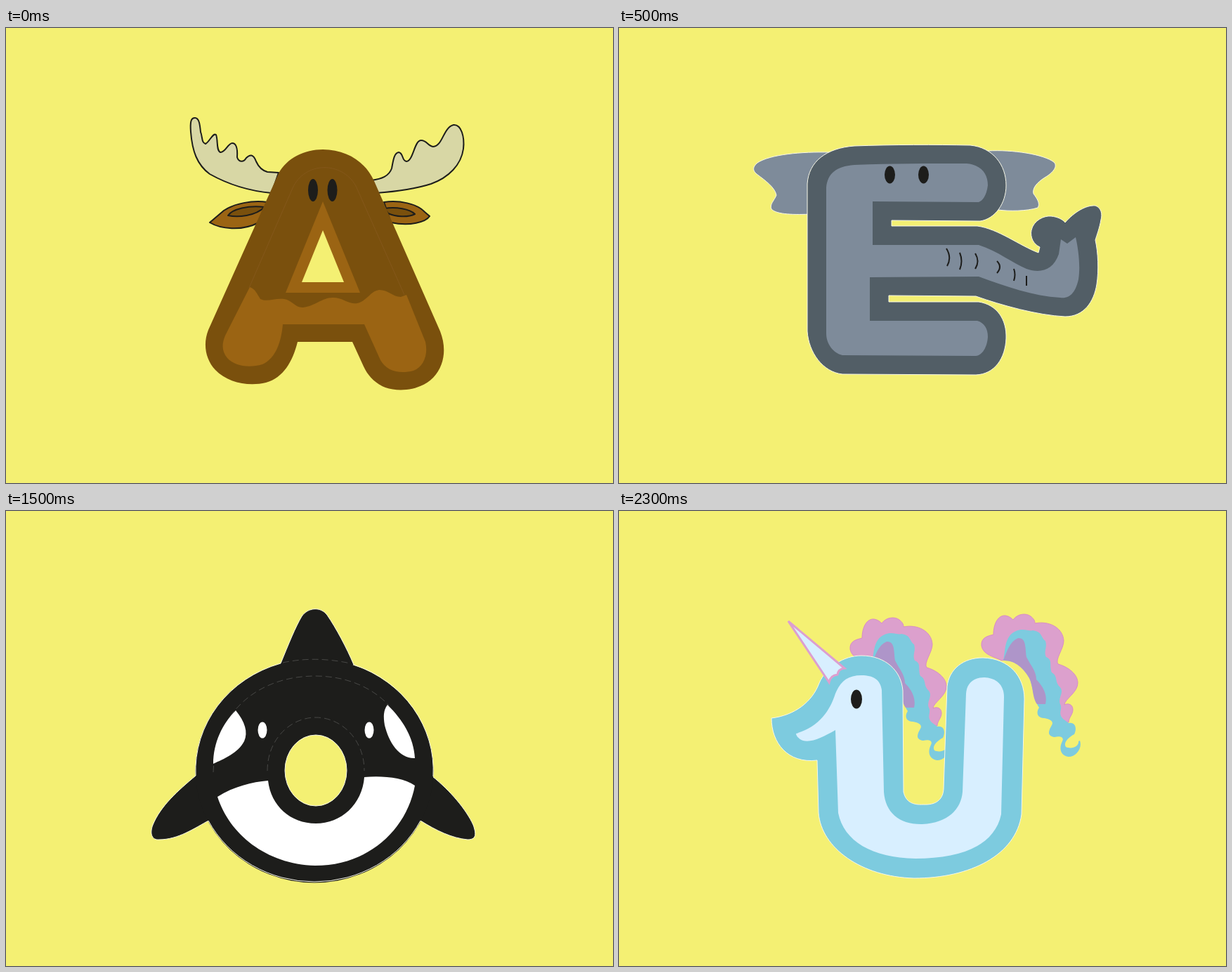
Animation, 864 px wide and 648 px high, one loop 2.5 s. Source, as an HTML page:

```html
<!DOCTYPE html>
<html lang="en">
<head>
<meta charset="utf-8">
<title>Animal vowels</title>
<style>
  html, body { margin: 0; width: 100%; height: 100%; overflow: hidden; background: #f4f073; }
  svg { display: block; width: 864px; height: 648px; }
  svg > g { display: none; }
  svg > g.on { display: inline; }
  .ink { fill: #1d1d1b; }
  .white { fill: #fff; }
  .sky { fill: #f4f073; }
  .line { stroke: #1d1d1b; stroke-width: 2; stroke-linejoin: round; }
  .halo { stroke: #f8f8e8; stroke-width: 1; }
  .bark { fill: #7a500d; }
  .fur { fill: #9b6413; }
  .antler { fill: #d8d7a5; }
  .slate { fill: #525e66; }
  .steel { fill: #7e8b9a; }
  .forest { fill: #009247; }
  .leaf { fill: #4cae4a; }
  .teal { fill: #7dcbdf; }
  .ice { fill: #d8efff; }
  .pink { fill: #dca0cd; }
  .lilac { fill: #ae95c9; }
  .seam { fill: none; stroke-width: 1; }
</style>
</head>
<body>
<svg viewBox="0 0 864 648">
  <g id="moose">
    <g class="line">
      <path class="antler" d="M388 206L372 205C365 203 360 199 356 190C352 179 347 180 342 185C338 192 331 191 329 184C330 170 327 164 322 164C316 164 312 178 305 177C299 174 302 160 299 152C294 149 290 162 284 165C278 163 280 156 277 148C276 138 275 128 269 128C263 128 262 134 263 148C265 175 272 195 290 208C315 222 345 232 378 235Z"/>
      <path class="antler" d="M520 217C535 215 545 211 549 200C551 190 552 178 559 177C566 178 563 189 570 190C580 189 581 160 591 160C599 160 600 168 608 169C622 168 622 142 637 138C648 137 653 155 651 172C648 195 630 213 605 222C580 230 555 233 527 235Z"/>
      <path class="fur" d="M372 248C350 245 325 250 310 260C303 266 296 272 290 277C305 286 335 290 360 277Z"/>
      <path class="fur" d="M538 248C560 245 585 250 596 262L603 268C598 276 575 283 548 277Z"/>
      <path class="bark" d="M368 255C345 252 322 258 316 267C330 270 355 268 368 255Z"/>
      <path class="bark" d="M539 257C555 254 575 258 582 265C572 270 555 269 544 264Z"/>
    </g>
    <path class="bark" d="M388 207C400 185 425 173 451 173C485 173 512 191 524 218L618 432C627 455 625 480 608 498C590 516 560 519 540 512C525 506 515 495 509 482L493 447H415C408 475 395 498 370 505C345 511 315 505 298 487C284 472 280 450 288 430Z"/>
    <path class="fur" d="M347 369C355 372 357 378 362 386C372 391 383 384 396 386C408 388 412 399 423 398C440 396 450 384 465 384C480 384 488 394 500 392C515 388 518 375 531 373C545 373 550 383 562 383L570 380L597 447C601 465 595 482 580 488C560 493 542 489 533 473L510 422H394C392 445 385 470 365 479C345 485 325 481 315 470C307 460 307 450 312 438Z"/>
    <path class="seam" stroke="#84571a" d="M346 370L408 228C425 190 478 189 498 225L567 380"/>
    <path class="fur" d="M451 247L504 377H398Z"/>
    <path class="sky" d="M451 288L481 362H421Z"/>
    <ellipse class="ink" cx="437" cy="231" rx="7" ry="16"/>
    <ellipse class="ink" cx="464.5" cy="231" rx="7" ry="16"/>
  </g>

  <g id="elephant">
    <path class="steel halo" d="M300 177C260 176 215 180 197 192C190 198 190 203 196 208C208 217 222 227 224 238C221 246 214 251 217 258C225 266 250 266 275 265Z"/>
    <path class="steel halo" d="M525 175C560 173 605 180 619 191C625 197 618 206 606 213C595 220 588 228 590 236C595 243 600 250 596 256C580 261 555 261 540 259Z"/>
    <path class="slate halo" d="M335 168C390 166 450 166 500 167C532 170 551 195 551 224C551 250 535 272 514 275L388 274V282H510C540 286 570 310 597 320L599 312C590 308 585 298 587 288C590 274 605 267 615 268C625 269 632 273 635 277C648 262 665 252 678 253C687 256 688 266 686 273C684 285 680 295 678 302C682 320 683 345 680 365C676 390 662 411 635 411C595 409 545 395 508 382L384 381V390H512C538 394 552 415 551 442C550 470 535 493 508 494L318 493C290 490 270 462 268 432V222C270 190 295 171 335 168Z"/>
    <path class="steel" d="M335 195C390 193 440 193 495 193C516 195 525 208 525 224C523 240 517 246 512 248L361 247V309H512C540 318 560 335 580 343C600 350 618 345 626 322L629 301L638 307L650 298C654 315 657 340 654 358C650 376 642 386 628 384C590 382 550 368 512 354L357 355V417H510C520 420 525 428 525 440C524 455 517 466 508 467L318 466C305 463 295 450 295 435V227C297 208 308 197 335 195Z"/>
    <ellipse class="ink" cx="385.5" cy="209" rx="7.5" ry="12.5"/>
    <ellipse class="ink" cx="433.5" cy="209" rx="7.5" ry="12.5"/>
    <path class="line" fill="none" stroke-width="2.5" d="M466 314Q474 327 467 339M485 320Q490 332 485 344M507 321Q514 332 507 343M538 332Q546 340 538 349M562 343Q565 351 562 360M580 353V367"/>
  </g>

  <g id="iguana">
    <path class="leaf" stroke="#1f3350" stroke-width="1.2" d="M503 450C512 470 525 490 543 488C556 485 560 470 556 458C552 451 547 456 553 463C550 472 538 468 536 456C536 446 545 439 555 440C572 443 581 460 581 478C580 500 560 517 535 517C515 517 498 508 485 494Z"/>
    <path id="spikes" class="forest" stroke="#1f3350" stroke-width="1.5"/>
    <rect class="forest halo" x="376" y="174.500" width="128.500" height="338.500" rx="64" stroke-opacity=".5"/>
    <path class="forest" d="M478 188L495 203L504 235V450H494V210Z"/>
    <rect class="leaf" x="401" y="199" width="78.500" height="289" rx="39"/>
    <ellipse class="ink" cx="426.500" cy="242" rx="7.500" ry="12.500"/>
    <ellipse class="ink" cx="451.500" cy="242" rx="7.500" ry="12.500"/>
  </g>

  <g id="orca">
    <path class="ink halo" d="M391 217C402 190 412 165 421 150C430 137 448 136 457 148C470 167 485 195 495 219L440 260Z"/>
    <path class="ink halo" d="M270 377C245 398 220 420 209 447C204 460 208 469 218 468C245 468 268 452 290 440L320 400Z"/>
    <path class="ink halo" d="M607 378C632 398 655 425 665 447C670 461 669 468 657 468C635 466 612 455 590 441L560 400Z"/>
    <ellipse class="ink" cx="439" cy="370" rx="169.500" ry="159.500"/>
    <path class="seam halo" d="M391 217A169.500 159.500 0 0 0 270 377M495 219A169.500 159.500 0 0 1 608 378M288 441A169.500 159.500 0 0 0 590 441"/>
    <path class="seam" stroke="#484846" stroke-dasharray="9 5" d="M394 216Q440 206 490 217M295 372C298 280 365 235 440 235C490 235 525 255 545 277M372 370C372 325 405 294 441 294S510 325 510 370"/>
    <path class="white" d="M301 407C325 392 350 386 373 384C377 420 405 445 441 445C477 445 507 418 510 379C535 377 565 379 582 391C570 455 515 505 440 505C370 503 318 460 301 407Z"/>
    <path class="white" d="M327 284C340 300 345 315 339 328C330 345 310 353 295 360C295 330 308 303 327 284Z"/>
    <path class="white" d="M543 276C565 298 580 322 582 352C560 353 545 330 539 305C537 293 537 284 543 276Z"/>
    <ellipse class="sky halo" cx="441" cy="369.500" rx="44" ry="50.500"/>
    <ellipse class="white" cx="365" cy="312" rx="6.500" ry="11.500"/>
    <ellipse class="white" cx="517" cy="312" rx="6.500" ry="11.500"/>
  </g>

  <g id="unicorn">
    <g id="mane">
      <path class="pink" stroke="#d88cc5" d="M545 213C535 208 518 205 516 192C515 180 525 178 533 176C533 160 540 148 550 149C556 150 559 153 561 155C567 146 580 145 586 150C590 153 592 156 592 160C612 156 632 166 633 185C633 196 620 212 625 218C636 221 652 230 653 244C654 258 634 268 634 276C640 273 646 276 646 283C646 290 640 294 640 301L628 300C600 260 570 200 545 213Z"/>
      <path class="teal" d="M547 213C550 200 548 178 565 171C575 166 585 172 589 170C603 172 600 180 607 185C610 195 604 200 608 208C618 212 612 220 616 230C625 235 620 243 627 250C635 258 624 266 628 275C632 282 624 288 632 296L640 302C650 300 652 310 648 318C640 322 632 330 636 336C645 340 655 335 654 328L656 327C660 338 650 350 640 350C628 348 626 338 631 328C634 322 628 320 620 322C608 320 612 312 616 305C620 298 610 296 605 295C594 294 594 286 598 280C590 268 590 255 585 240C578 225 565 212 547 213Z"/>
      <path class="lilac" d="M547 213C552 200 556 186 568 181C580 180 578 195 580 208C586 220 594 228 594 240C604 250 610 262 607 275L595 275C588 266 590 250 584 238C576 224 563 212 547 213Z"/>
    </g>
    <use href="#mane" x="-187" y="5"/>
    <path class="teal halo" d="M217 295C250 291 275 272 285 245C295 222 320 206 345 206C380 206 402 228 404 256L405 400C408 414 418 419 433 418C450 419 461 412 462 396L467 250C470 225 490 209 518 209C555 210 577 235 577 268L573 432C565 490 500 523 420 523C345 521 288 480 284 430L282 355C240 360 217 330 217 295Z"/>
    <path class="ice" d="M345 234C362 234 372 240 374 255L377 400C379 430 400 447 432 446C468 444 487 425 489 400L494 260C495 245 505 237 520 237C538 238 548 248 548 265L544 432C535 475 490 495 422 495C360 494 320 470 312 430L308 312C290 322 275 330 262 327C256 325 252 320 252 317C285 307 300 285 308 260C315 243 325 234 345 234Z"/>
    <path class="ice" stroke="#dc9fd0" stroke-width="3" d="M241 157L321 224Q312 225 311 233Q301 234 299 244Z"/>
    <ellipse class="ink" cx="338" cy="268" rx="8" ry="13.500"/>
  </g>
</svg>
<script>
  const STEP = 500;
  const scenes = [...document.querySelectorAll("svg > g")];

  // Each spike: tip x, tip y, height of its base.
  const tips = [
    [502, 193, 14], [519, 211, 16], [519, 240, 15], [522, 265, 13], [522, 286, 12],
    [520, 304, 12], [520, 326, 12], [524, 346, 13], [519, 367, 11], [520, 383, 9],
    [517, 396, 8], [516, 409, 9], [516, 431, 9], [521, 443, 9]
  ];
  const backSpike = ([x, y, h]) => {
    const base = y < 200 ? 482 : y < 220 ? 495 : 504;
    return `M${base} ${y - h * 0.3}Q${base + 7} ${y + 1} ${x} ${y}Q${x - 5} ${y + h * 0.8} ${base} ${y + h * 0.75}`;
  };
  const tailSpike = (x, y) => `M${x - 13} ${y - 2}Q${x - 5} ${y + 2} ${x} ${y}Q${x - 1} ${y + 9} ${x - 6} ${y + 12}`;
  document.getElementById("spikes").setAttribute("d",
    tips.map(backSpike).join("") +
    [[522, 456], [529, 464], [534, 471], [549, 475]].map(p => tailSpike(...p)).join(""));

  function draw() {
    const current = Math.floor(performance.now() / STEP) % scenes.length;
    scenes.forEach((scene, i) => scene.classList.toggle("on", i === current));
    requestAnimationFrame(draw);
  }
  draw();
</script>
</body>
</html>
```
